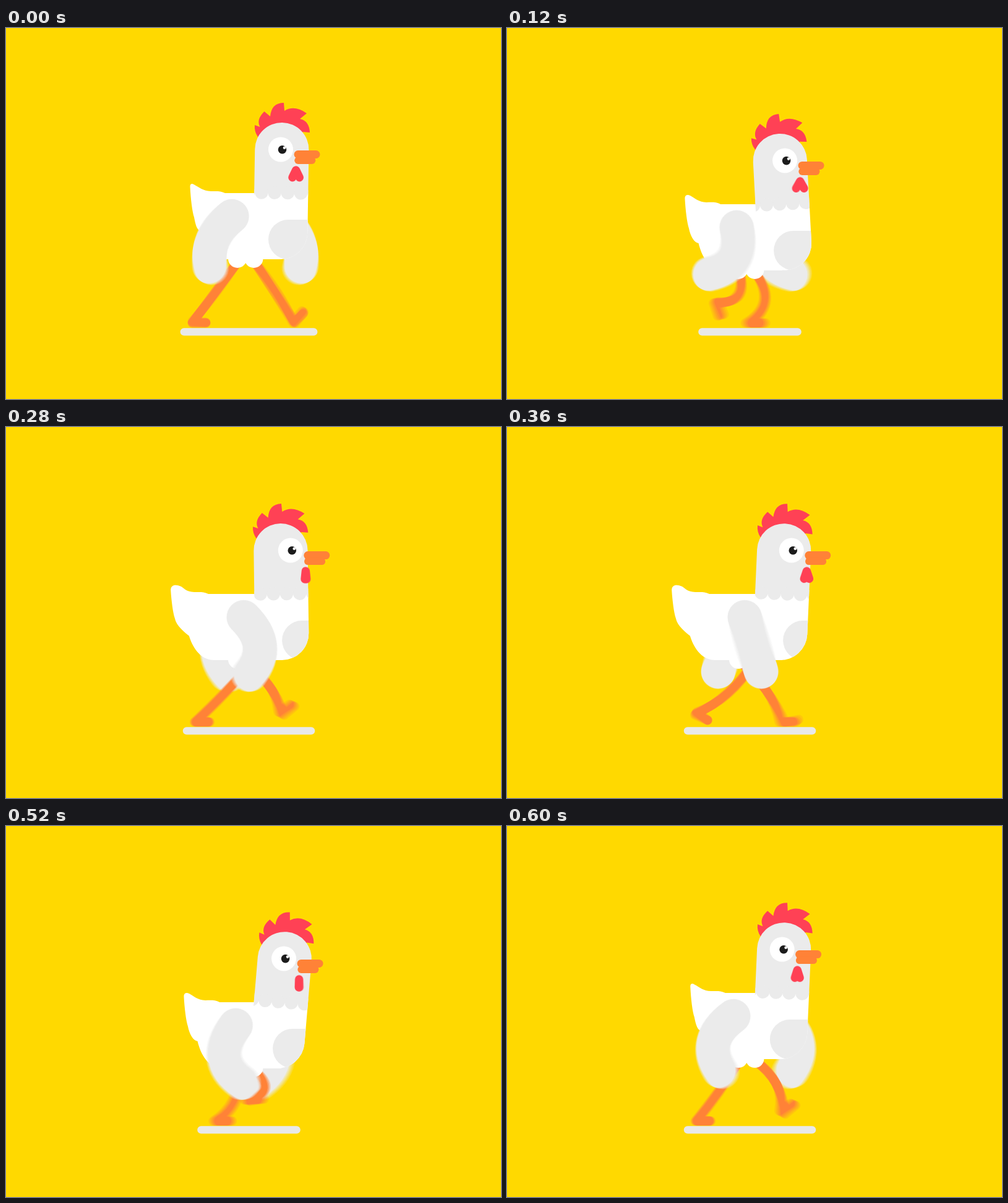
Animation of 800x600 px, one loop 640 ms. Source, as an HTML page with a canvas:

```html
<!DOCTYPE html>
<html>
<head>
<meta charset="utf-8">
<title>Walking chicken</title>
<style>
html, body { margin: 0; width: 100%; height: 100%; overflow: hidden; background: #ffd900; }
canvas { display: block; }
</style>
</head>
<body>
<canvas id="stage" width="800" height="600"></canvas>
<script>
const LOOP = 640, STEP = 40, TAU = Math.PI * 2, RAD = Math.PI / 180;
const GREY = 'rgb(235,235,235)', ORANGE = 'rgb(255,130,55)', RED = 'rgb(255,65,85)';
const c = document.getElementById('stage').getContext('2d');
const layer = document.createElement('canvas');
layer.width = 800;
layer.height = 600;
const o = layer.getContext('2d');
o.lineCap = o.lineJoin = 'round';

const COMB = new Path2D('M407 176Q401 167 402 157L410.5 160Q404 148 417.5 135L427 143' +
  'Q429 121 449 121L450 134Q466 124 486 138L475 147Q490 150 491 169L480 168L445 190Z');

// Cosine over the loop: whole cycles per loop, delay in degrees
const wave = (t, cycles = 1, delay = 0) => Math.cos(TAU * t * cycles / LOOP - delay * RAD);
const hump = (x, skew) => Math.sin(Math.PI * x ** skew);

// Foot pose: planted and sliding back for half the loop, then swung forward
function stride(t) {
  const phase = ((t / LOOP) % 1 + 1) % 1 * 2;
  if (phase < 1) {
    const p = phase;
    return {
      x: 468 - 167 * p * (1 + p - p * p),
      y: 477,
      angle: -52 * Math.max(0, 1 - 8 * p),
      bend: 44 * hump(p, 0.75) ** 2
    };
  }
  const q = phase - 1, turn = 0.58;
  return {
    x: 301 + 167 * (q - 1.05 * q * (1 - q) ** 2),
    y: 477 - 36 * hump(q, 1),
    angle: q < turn ? 72 * hump(q / turn, 1.3) : -52 * (q - turn) / (1 - turn),
    bend: 48 * hump(q, 1.15) ** 0.7
  };
}

// Strokes one path at five moments and blends them
function blurred(color, width, t, dy, trace) {
  o.globalCompositeOperation = 'source-over';
  o.globalAlpha = 1;
  o.clearRect(0, 0, 800, 600);
  o.globalCompositeOperation = 'lighter';
  o.globalAlpha = 0.2;
  o.strokeStyle = color;
  o.lineWidth = width;
  for (let i = -2; i <= 2; i++) {
    o.beginPath();
    trace(t + i * 4);
    o.stroke();
  }
  c.drawImage(layer, 0, dy);
}

// Curved limb whose joint sits a little past the middle
function limb(x, y, endX, endY, bend) {
  const dx = endX - x, dy = endY - y, len = Math.hypot(dx, dy), joint = 0.55;
  o.moveTo(x, y);
  o.quadraticCurveTo(x + dx * joint + dy / len * bend, y + dy * joint - dx / len * bend, endX, endY);
}

function leg(t, hipX, hipY) {
  blurred(ORANGE, 15, t, 0, s => {
    const { x, y, angle, bend } = stride(s);
    limb(hipX, hipY, x, y, bend);
    o.lineTo(x + 22 * Math.cos(angle * RAD), y + 22 * Math.sin(angle * RAD));
  });
}

function wing(t, dy, side, shoulder) {
  blurred(GREY, 55.5, t, dy, s => {
    const x = shoulder(s), twice = wave(s, 2, 90);
    const angle = (-5.2 - 25.6 * wave(s, 1, 46) - 2 * twice) * RAD;
    const len = 91 - 2.5 * wave(s, 1, 45) - 2 * twice;
    const bend = 48 * Math.sin(Math.PI / 2 * wave(s, 1, 112));
    limb(x, 304.5, x + side * len * Math.sin(angle), 304.5 + len * Math.cos(angle), side * bend);
  });
}

function disc(color, x, y, r) {
  c.fillStyle = color;
  c.beginPath();
  c.arc(x, y, r, 0, TAU);
  c.fill();
}

function bar(color, x, y, w, h, r) {
  c.fillStyle = color;
  c.beginPath();
  c.roundRect(x, y, w, h, r);
  c.fill();
}

function tilt(degrees) {
  c.translate(444.8, 262);
  c.rotate(degrees * RAD);
  c.translate(-444.8, -262);
}

// k runs from 0 (tail pulled in) to 1 (tail stretched out)
function rump(k) {
  const root = 354 - 28 * k, tip = 297.5 - 32.5 * k, r = 2.5 + 4.5 * k, low = 316 - 21 * k;
  c.fillStyle = '#fff';
  c.beginPath();
  c.moveTo(root, 267);
  c.bezierCurveTo(root - 8, 263, root - 15, 264, root - 23, 264);
  c.bezierCurveTo(root - 36, 263.5, tip + 12 + 1.5 * r, 258, tip + 2.4 * r, 252 + 0.4 * r);
  c.bezierCurveTo(tip + 1.25 * r, 251, tip, 251.5, tip, 254 + r);
  c.bezierCurveTo(tip + 1, 277, tip + 3.5, 297, tip + 6.5, 306);
  c.bezierCurveTo(tip + 9, 319, low - 7, 329, low, 328 + 7 * k);
  c.bezierCurveTo(low + 5, 351, low + 17, 374, low + 41, 374);
  c.lineTo(445, 374);
  c.lineTo(445, 267);
  c.fill();
  disc('#fff', 374, 373, 15);
  disc('#fff', 400.5, 373, 15);
}

function headAndChest(t, sway) {
  const lean = -4.3 * wave(t, 1, 90);
  c.save();
  tilt(lean);
  c.fillStyle = RED;
  c.fill(COMB);
  c.restore();

  c.save();
  tilt(lean + 0.9);
  c.beginPath();
  c.roundRect(401.2, 153, 87.2, 221, 43.6);
  c.clip();
  c.fillStyle = '#fff';
  c.fillRect(390, 267, 110, 120);
  c.fillStyle = GREY;
  c.fillRect(390, 140, 110, 127.5);
  for (let i = -2; i < 5; i++) disc(GREY, 413 + 10 * (1 - sway) + i * 21.2, 266.5, 10.7);
  tilt(-lean - 0.9);
  bar(GREY, 435.5 - 11.5 * sway, 310, 140, 64, 32);
  c.restore();
}

function face(sway) {
  const x = 8.2 * (1 - sway);
  disc('#fff', 444 + x, 196.5, 20);
  disc('#1c1c1c', 446.5 + x, 196.7, 6.8);
  disc('#fff', 450 + x, 193.7, 2.3);
  bar(ORANGE, 465.5 + x, 198, 42, 13, 6.5);
  bar(ORANGE, 466.3 + x, 208.5, 34, 11.5, 5.7);
}

function wattle(t, dy) {
  blurred(RED, 13.4, t, dy, s => {
    const spread = 1.3 + 5.7 * wave(s, 1, 40);
    const mid = 468.6 + 8.2 * (1 - wave(s)), y = 230 + Math.sqrt(169 - spread * spread);
    o.moveTo(mid - spread, y);
    o.lineTo(mid, 230);
    o.lineTo(mid + spread, y);
  });
}

function draw(t) {
  const sway = wave(t), beat = wave(t, 2), bob = 10.5 * (1 - beat);
  const half = 95 + 16.6 * beat - 0.7 * wave(t, 4);
  c.fillStyle = '#ffd900';
  c.fillRect(0, 0, 800, 600);
  bar('#e9e9e9', 392.5 - half, 485.2, half * 2, 12.3, 6.1);

  wing(t, bob, -1, s => 403 + 38 * wave(s));
  leg(t + LOOP / 2, 376, 376 + bob);
  leg(t, 400, 376 + bob);

  c.save();
  c.translate(0, bob);
  rump((1 - sway) / 2);
  headAndChest(t, sway);
  face(sway);
  c.restore();

  wattle(t, bob);
  wing(t, bob, 1, s => 375 - 10 * wave(s));
}

const start = performance.now();
function tick() {
  const t = (performance.now() - start) % LOOP;
  draw(Math.floor(t / STEP) * STEP);
  requestAnimationFrame(tick);
}
tick();
</script>
</body>
</html>
```
